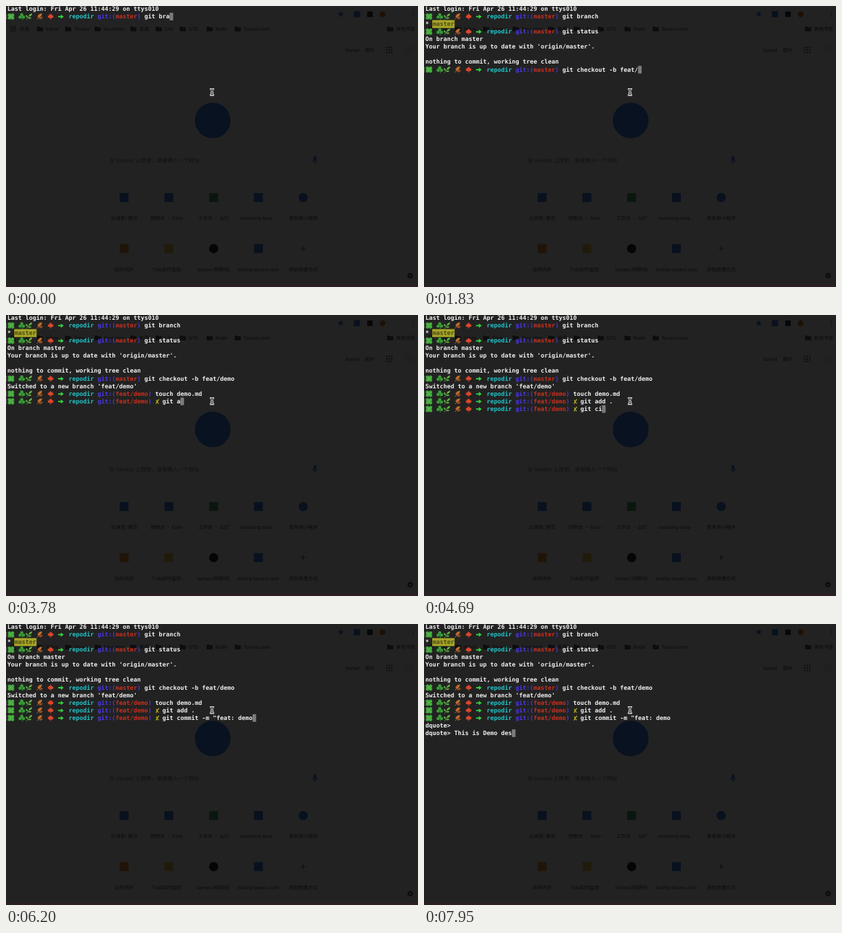
An HTML page that plays this animation: 600x410 px, repeating every 8000 ms.

```html
<!DOCTYPE html>
<html lang="zh">
<head>
<meta charset="utf-8">
<title>Terminal session</title>
<style>
html, body { margin: 0; width: 100%; height: 100%; overflow: hidden; background: #222; }
svg { display: block; width: 600px; height: 410px; }
text { white-space: pre; text-rendering: geometricPrecision; }
#page text { font: 7px "Noto Sans CJK SC", "Noto Sans CJK", "Noto Sans", sans-serif; fill: #3c4043; }
#page .mid { text-anchor: middle; }
#term text { font: bold 8.72px "DejaVu Sans Mono", monospace; fill: #f0f0f0; }
#term .cyan { fill: #22c3c8; }
#term .blue { fill: #4a38e6; }
#term .red { fill: #c9301f; }
#term .olive { fill: #4b4c18; }
</style>
</head>
<body>
<svg viewBox="0 0 600 410">
  <defs>
    <g id="clover">
      <path d="M5.4 5.4Q6 8.6 8 10.4" fill="none" stroke="#2c7d2c" stroke-width="1"/>
      <g fill="#43a83c">
        <circle cx="3.1" cy="3.1" r="2.5"/><circle cx="7.5" cy="3.1" r="2.5"/>
        <circle cx="3.1" cy="7.3" r="2.5"/><circle cx="7.5" cy="7.3" r="2.5"/>
      </g>
      <path d="M3.2 3.2L7.4 7.2M7.4 3.2L3.2 7.2" stroke="#8bd672" stroke-width=".6"/>
    </g>
    <g id="shamrock">
      <path d="M5.2 5.5Q5 8.5 6.6 10.4" fill="none" stroke="#2c7d2c" stroke-width="1.1"/>
      <g fill="#3a9c38">
        <circle cx="5.2" cy="2.8" r="2.4"/><circle cx="2.7" cy="6.2" r="2.3"/><circle cx="7.8" cy="6.2" r="2.3"/>
      </g>
    </g>
    <g id="herb">
      <path d="M1.5 10Q4 5 9 1.5" fill="none" stroke="#4e9a3a" stroke-width=".9"/>
      <path d="M5 5.5Q4.5 1.5 9.8 .6Q10 4.4 5 5.5ZM3.4 7Q.2 6.4 .6 3Q3.8 3.6 3.4 7ZM3.6 7.6Q5.5 5.4 9 7Q7 9.8 3.6 7.6Z" fill="#62b046"/>
    </g>
    <g id="fallen">
      <path d="M1.6 5.6Q3 1 8.6 .8Q8.4 5.2 3.8 6.6Z" fill="#b5652a"/>
      <path d="M3.6 7Q6 4.4 9.8 6.4Q8.4 10 4.6 9Z" fill="#8f4a22"/>
      <path d="M1 9.6L7.4 2" stroke="#d99a4c" stroke-width=".6"/>
    </g>
    <path id="maple" fill="#d9482b" d="M5.2 .8L6.4 2.8L7.6 2.3L7.5 4.1L9.6 3.7L8.9 5.4L9.6 6.2L7 7.8L5.7 7.6V10H4.8V7.6L3.4 7.8L.9 6.2L1.6 5.4L.9 3.7L3 4.1L2.8 2.3L4 2.8Z"/>
    <path id="arrow" fill="#30cf3d" d="M.4 4.5H4.4V2.4L8.6 5.5L4.4 8.6V6.5H.4Z"/>
    <path id="cross" fill="none" stroke="#b0ac24" stroke-width="1.3" d="M1.2 8.8Q3 4.8 5.4 2.2M1.6 3.2Q3 6.6 5 8.4"/>
    <path id="folder" fill="#5f6368" d="M0 1.2Q0 .4 .8 .4H3.4L4.4 1.6H8.2Q9 1.6 9 2.4V6.8Q9 7.6 8.2 7.6H.8Q0 7.6 0 6.8Z"/>
    <path id="beam" d="M298.2 121.3Q300 121.3 300 122.8V128.4Q300 129.9 298.2 129.9M301.8 121.3Q300 121.3 300 122.8M300 128.4Q300 129.9 301.8 129.9M299.2 126.4H300.8"/>
  </defs>
  <rect width="600" height="410" fill="#fff"/>
  <g id="page"></g>
  <rect width="600" height="410" fill="#000" opacity=".866"/>
  <rect y="406" width="600" height="4" fill="#2b2024"/>
  <g id="term"></g>
  <g fill="none" stroke-linecap="square">
    <use href="#beam" stroke="#eee" stroke-width="2.6"/>
    <use href="#beam" stroke="#111" stroke-width=".9"/>
  </g>
</svg>
<script>
const LOOP = 8000, COL = 5.25, ROW = 11.07, LEFT = 2, TOP = -1.2;
const WIDTH = { '': 0, quote: 8, master: 38, feat: 41, dirty: 43 };
const colX = c => LEFT + c * COL;
const rowY = r => TOP + r * ROW;

// Browser page, dimmed by the dark sheet above it
const label = (x, y, s, attrs = '') => `<text x="${x}" y="${y}" ${attrs}>${s}</text>`;
const square = (x, y, size, fill) =>
  `<rect x="${x - size / 2}" y="${y - size / 2}" width="${size}" height="${size}" fill="${fill}"/>`;
const disc = (x, y, r, fill) => `<circle cx="${x}" cy="${y}" r="${r}" fill="${fill}"/>`;

function bookmarks() {
  const items = [[45, 'Inbox'], [86, 'Tovaru'], [129, 'Devnotes'], [181, '英语'], [218, 'Life'],
    [253, 'GTD'], [292, 'Node'], [333, 'Tovaru.com'], [555, '其他书签']];
  return items.map(([x, s]) =>
    `<use href="#folder" x="${x}" y="29.5"/>` + label(x + 13, 36, s)).join('') + label(20, 36, '应用');
}

function dots(x, y, size, gap, cols, fill) {
  let out = '';
  for (let i = 0; i < cols * 3; i++)
    out += square(x + (i % cols) * gap, y + Math.floor(i / cols) * gap, size, fill);
  return out;
}

function shortcuts() {
  const blue = '#3b82d8';
  const tiles = [
    ['云消息) 首页', blue], ['控制台 · Core…', blue], ['工作台 · 山灯', '#4fae6a'],
    ['corelamp.tova…', blue], ['青禾袋小程序', blue, 1],
    ['云岭内外', '#f09a3a'], ['Tide实时监控…', '#f2c14e'], ['lumea (林野闲)', '#24292e', 1],
    ['nodrip.tovaru.com', blue], ['添加快捷方式', null]];
  return tiles.map(([s, fill, round], i) => {
    const x = 172 + (i % 5) * 65.2, y = i < 5 ? 279.5 : 354;
    const icon = !fill ? `<path d="M${x - 3.5} ${y}h7M${x} ${y - 3.5}v7" stroke="#5f6368"/>`
      : round ? disc(x, y, 6.7, fill) : square(x, y, 13, fill);
    return icon + label(x, y + 32.5, s, 'class="mid"');
  }).join('');
}

document.getElementById('page').innerHTML =
  bookmarks() + dots(7.5, 30.5, 1.8, 2.9, 3, '#5f6368') +
  '<path d="M487.5 7L488.8 10.2L492.2 10.4L489.6 12.6L490.4 15.9L487.5 14.1L484.6 15.9L485.4 12.6L482.8 10.4L486.2 10.2Z" fill="#4285f4"/>' +
  square(511, 12, 9, '#3b82d8') + square(530, 12, 8, '#333') + disc(548.5, 12, 4.3, '#e2761b') +
  dots(593, 9, 1.3, 3, 1, '#5f6368') +
  label(494, 66.5, 'Vomel') + label(523, 66.5, '图片') +
  dots(554.5, 60.5, 2, 3.6, 3, '#5f6368') + disc(587, 64, 7, '#eee') +
  disc(301, 167, 26, '#4285f4') +
  label(151, 228, '在 Vandor 上搜索，或者输入一个网址', 'style="font-size:7.8px;fill:#757575"') +
  '<rect x="448" y="219" width="4" height="7.4" rx="2" fill="#4285f4"/>' +
  '<path d="M446.3 224Q446.3 228 450 228T453.7 224M450 228V231" fill="none" stroke="#4285f4"/>' +
  shortcuts() +
  '<circle cx="588.5" cy="393.5" r="2.4" fill="none" stroke="#3c4043" stroke-width="1.7"/>' +
  '<circle cx="588.5" cy="393.5" r="3.7" fill="none" stroke="#3c4043" stroke-width="1" stroke-dasharray="1.9 1"/>';

// Session log: [time, row, prompt, text]
const log = [], current = {};

function put(t, row, prompt, text = '') {
  current[row] = [prompt, text];
  log.push([t, row, prompt, text]);
}

// Keystrokes separated by "|", spread evenly; "<" is a backspace.
function type(row, from, to, keys) {
  const steps = keys.split('|');
  steps.forEach((key, i) => {
    const [prompt, text] = current[row];
    const t = from + (to - from) * i / (steps.length - 1 || 1);
    put(Math.round(t / 10) * 10, row, prompt, key === '<' ? text.slice(0, -1) : text + key);
  });
}

put(0, 0, '', 'Last login: Fri Apr 26 11:44:29 on ttys010');
put(0, 1, 'master', 'git bra');
type(1, 30, 30, 'nch ');
put(80, 2, '');
put(120, 2, '', '* master');
put(120, 3, 'master');
type(3, 190, 450, 'g|i|t| |s|ta|tus ');
put(500, 4, '');
put(560, 4, '', 'On branch master');
put(560, 5, '', "Your branch is up to date with 'origin/master'.");
put(560, 7, '', 'nothing to commit, working tree clean');
put(560, 8, '');
put(590, 8, 'master');
type(8, 850, 1020, 'gi|t |c|he');
type(8, 1200, 1830, 'c|k|o|ut |-|b| |f|e|a|t|/');
type(8, 1860, 1930, 'd|e|m|o');
put(1960, 9, '');
put(1990, 9, '', "Switched to a new branch 'feat/demo'");
put(1990, 10, '');
put(2020, 10, 'feat');
type(10, 2320, 2440, 'to|u|c|h| ');
type(10, 2810, 2930, 'd|e|m|o');
type(10, 3080, 3160, '.|m|d');
put(3200, 11, '');
put(3240, 11, 'dirty');
type(11, 3500, 3560, 'g|i|t ');
type(11, 3780, 3780, 'a');
type(11, 3850, 3880, 'd|d ');
type(11, 4030, 4030, '.');
put(4060, 12, '');
put(4090, 12, 'dirty');
type(12, 4270, 4370, 'g|i|t ');
type(12, 4510, 4540, 'c|i ');
type(12, 4690, 4690, '<');
type(12, 4800, 4990, '<|o|m|m|i|t');
type(12, 5320, 5530, ' |-|m| ');
type(12, 5680, 5840, '"f|e|a|t|:');
type(12, 5990, 6200, ' d|e|m|o');
put(6310, 13, 'quote');
put(6450, 14, 'quote');
type(14, 6860, 7070, 'T|h|i|s| |i|s| ');
type(14, 7220, 7310, 'D|e|m|o');
type(14, 7460, 7950, ' |D|e|s|c|<|<|<|<|d|e|s');

const words = (row, col, s, cls = '') => label(colX(col), rowY(row) + 8.2, s, `class="${cls}"`);
const glyph = (row, col, id) => `<use href="#${id}" x="${colX(col)}" y="${rowY(row) + .2}"/>`;

function promptMarkup(row, kind) {
  if (!kind) return '';
  if (kind === 'quote') return words(row, 0, 'dquote>');
  const branch = kind === 'master' ? 'master' : 'feat/demo';
  const icons = [[0, 'clover'], [3, 'shamrock'], [5, 'herb'], [8, 'fallen'], [11, 'maple'], [14, 'arrow']];
  return `<path d="M1.4 ${rowY(row) + 2}H.5v7H1.4" fill="none" stroke="#777" stroke-width=".6"/>` +
    icons.map(([col, id]) => glyph(row, col, id)).join('') +
    words(row, 17, 'repodir', 'cyan') + words(row, 25, 'git:(', 'blue') +
    words(row, 30, branch, 'red') + words(row, 30 + branch.length, ')', 'blue') +
    (kind === 'dirty' ? glyph(row, 41, 'cross') : '');
}

function lineMarkup(row, prompt, text) {
  if (text === '* master')
    return words(row, 0, '*') +
      `<rect x="${colX(2) - .5}" y="${rowY(row) - .4}" width="${COL * 6 + 1}" height="${ROW + .6}" fill="#a7a427"/>` +
      words(row, 2, 'master', 'olive');
  return promptMarkup(row, prompt) + words(row, WIDTH[prompt], text);
}

const term = document.getElementById('term');
let shown = 0;

function draw(time) {
  const past = log.filter(e => e[0] <= time);
  if (past.length === shown) return;
  shown = past.length;
  const lines = {};
  for (const [, row, prompt, text] of past) lines[row] = [prompt, text];
  const [, row, prompt, text] = past[shown - 1];
  const cursor = `<rect x="${colX(WIDTH[prompt] + text.length)}" y="${rowY(row)}" width="${COL}" height="${ROW}" fill="#7b7b7b"/>`;
  term.innerHTML = Object.entries(lines).map(([r, line]) => lineMarkup(+r, ...line)).join('') + cursor;
}

function tick() {
  draw(performance.now() % LOOP);
  requestAnimationFrame(tick);
}
tick();
</script>
</body>
</html>
```
